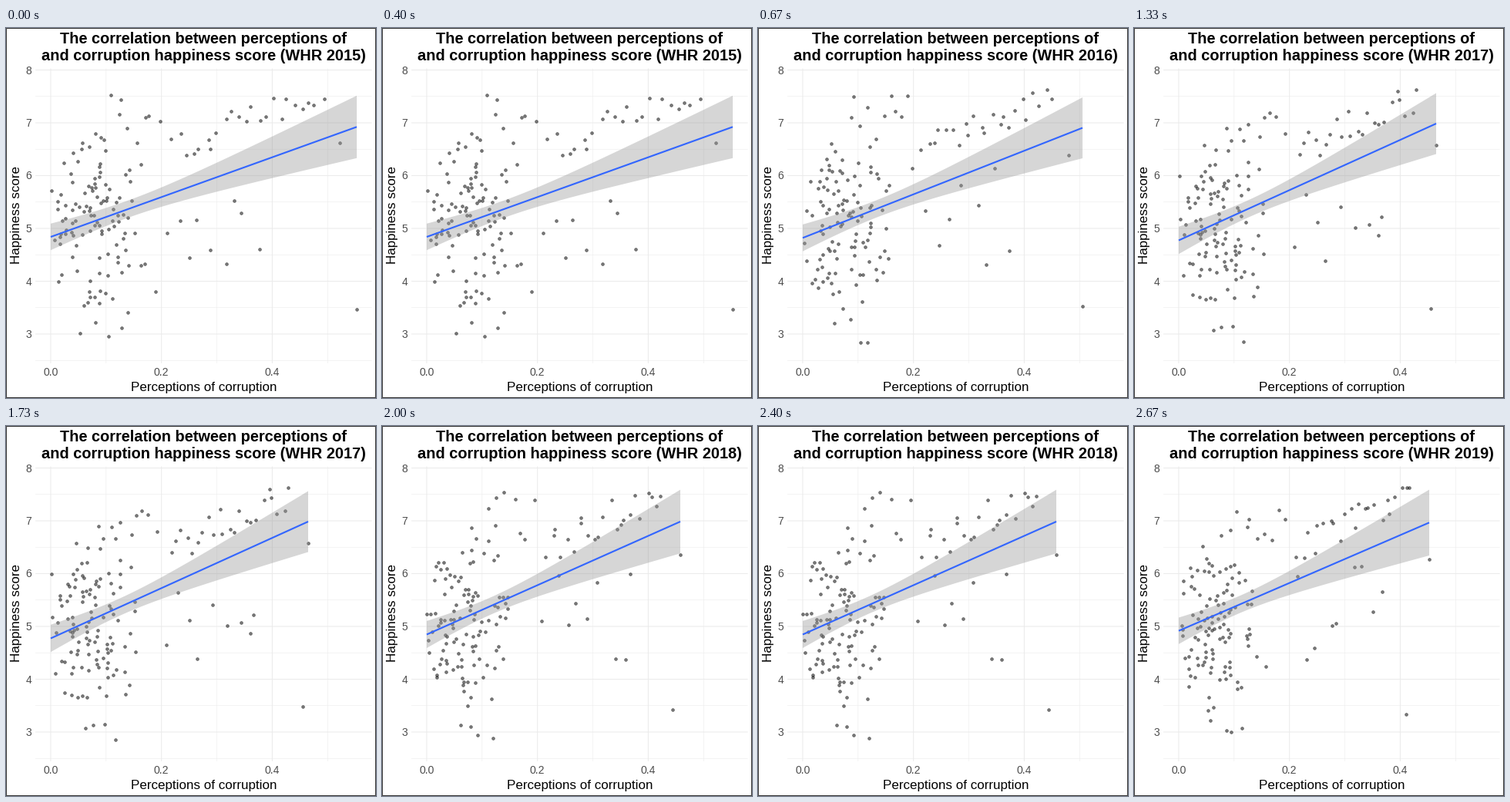
Write a matplotlib script that moves like this. It is 480 px wide and 480 px high and loops after 3330 ms.

```python
import numpy as np
import matplotlib.pyplot as plt
from matplotlib.animation import FuncAnimation
from matplotlib.patches import Rectangle

SIZE, DPI = 480, 80
PT = 72 / DPI  # points per pixel
LEFT, RIGHT, TOP, BOTTOM = 38.2, 474.5, 52.5, 435
MID_X, MID_Y = (LEFT + RIGHT) / 2, (TOP + BOTTOM) / 2
ORIGIN = 58
MIN_BAND = 11.2
TOTAL = 156
TICK = 10  # ms

plt.rcParams["font.family"] = "Liberation Sans"

# ms shown, line start y, line end y, band half-height at the end,
# most corrupt happy country, lone unhappy country
YEARS = {
    2015: (670, 271, 128.3, 40.5, (433, 149), (455, 365)),
    2016: (660, 272.3, 129.5, 39.5, (403, 165), (421, 361)),
    2017: (670, 275.5, 124, 39.5, (392, 152), (385, 364)),
    2018: (670, 270.5, 124, 41.3, (387, 167), (377, 368)),
    2019: (660, 265.7, 125.3, 42.7, (383, 173), (353, 374)),
}


def to_x(v):
    return ORIGIN + 718.5 * v


def to_y(v):
    return 54.5 + 68.5 * (8 - v)


def box(rng, n, x0, x1, y0, y1):
    """Evenly random points, one per vertical strip."""
    x = x0 + (x1 - x0) * (np.arange(n) + rng.random(n)) / n
    return list(zip(x, rng.uniform(y0, y1, n)))


def scatter_points(year, edge, lone):
    """Sparse groups around a dense cloud that keeps a little spacing."""
    rng = np.random.default_rng(year)
    points = [edge, lone]
    points += box(rng, 10, 112, 200, 86, 150)
    points += box(rng, 9, 200, 335, 175, 310)
    points += box(rng, 4, 90, 150, 378, 408)
    for x, lift in box(rng, 23, 210, edge[0] - 20, -22, 22):
        rise = 75 * (x - 210) / (edge[0] - 230)
        points.append((x, max(160 - rise + lift, 80)))

    width = 140 - 5.5 * (year - 2015)
    while len(points) < TOTAL:
        x = ORIGIN + width * rng.beta(1.7, 2.6)
        y = rng.normal(255, 65)
        reach = min(70 + 1.3 * (x - ORIGIN), 115)
        near = min(np.hypot(x - a, y - b) for a, b in points)
        if abs(y - 258) < reach and near > 3.5:
            points.append((x, y))
    return np.array(points)


def fit_band(year, start_y, end_y, end_half, end_x):
    """Regression line with its hyperbolic confidence band."""
    mean_x = 158 - 5.5 * (year - 2015)
    x = np.linspace(ORIGIN, end_x, 80)
    y = np.linspace(start_y, end_y, 80)
    slope = np.sqrt(end_half**2 - MIN_BAND**2) / (end_x - mean_x)
    return x, y, np.hypot(MIN_BAND, slope * (x - mean_x))


fig = plt.figure(figsize=(SIZE / DPI, SIZE / DPI), dpi=DPI, facecolor="white")
ax = fig.add_axes([0, 0, 1, 1])
ax.set_xlim(0, SIZE)
ax.set_ylim(SIZE, 0)
ax.axis("off")


def label(x, y, text, px, **kw):
    return ax.text(x, y, text, fontsize=px * PT, **{"ha": "center", **kw})


def grid(xs, ys, px):
    style = dict(color="#EBEBEB", lw=px * PT, zorder=1, snap=False)
    ax.vlines([to_x(v) for v in xs], TOP, BOTTOM, **style)
    ax.hlines([to_y(v) for v in ys], LEFT, RIGHT, **style)


grid([0.1, 0.3, 0.5], np.arange(2.5, 8), 0.53)
grid([0, 0.2, 0.4], range(3, 9), 1.07)
for v in (0, 0.2, 0.4):
    label(to_x(v), 451, f"{v:.1f}", 14, color="#4D4D4D")
for v in range(3, 9):
    label(33, to_y(v) + 5, str(v), 14, color="#4D4D4D", ha="right")
label(MID_X, 471, "Perceptions of corruption", 17)
label(18, MID_Y - 1, "Happiness score", 17, rotation=90,
      rotation_mode="anchor", va="baseline")
label(MID_X - 0.5, 20.5, "The correlation between perceptions of", 20,
      weight="bold")
title = label(MID_X, 42.5, "", 20, weight="bold")
ax.add_patch(Rectangle((0.5, 0.5), SIZE - 1, SIZE - 1, fill=False,
                       ec="#333333", lw=PT, snap=False))

dots = ax.scatter([], [], s=(3.7 * PT)**2, fc="black", ec="black",
                  lw=0.8 * PT, alpha=0.5, zorder=2)
band, = ax.fill([], [], color="#999999", alpha=0.4, lw=0, zorder=3)
line, = ax.plot([], [], color="#3366FF", lw=2.13 * PT, zorder=4,
                solid_capstyle="butt")

scenes, schedule = [], []
for year, (shown, start_y, end_y, half, edge, lone) in YEARS.items():
    end_x = max(edge[0], lone[0])
    schedule += [len(scenes)] * (shown // TICK)
    scenes.append((year, scatter_points(year, edge, lone),
                   fit_band(year, start_y, end_y, half, end_x)))


def update(i):
    year, points, (x, y, half) = scenes[schedule[i]]
    title.set_text(f"and corruption happiness score (WHR {year})")
    dots.set_offsets(points)
    band.set_xy(np.column_stack([np.r_[x, x[::-1]],
                                 np.r_[y - half, (y + half)[::-1]]]))
    line.set_data(x, y)
    return title, dots, band, line


anim = FuncAnimation(fig, update, frames=len(schedule), interval=TICK,
                     repeat=True, repeat_delay=0)
plt.show()
```
